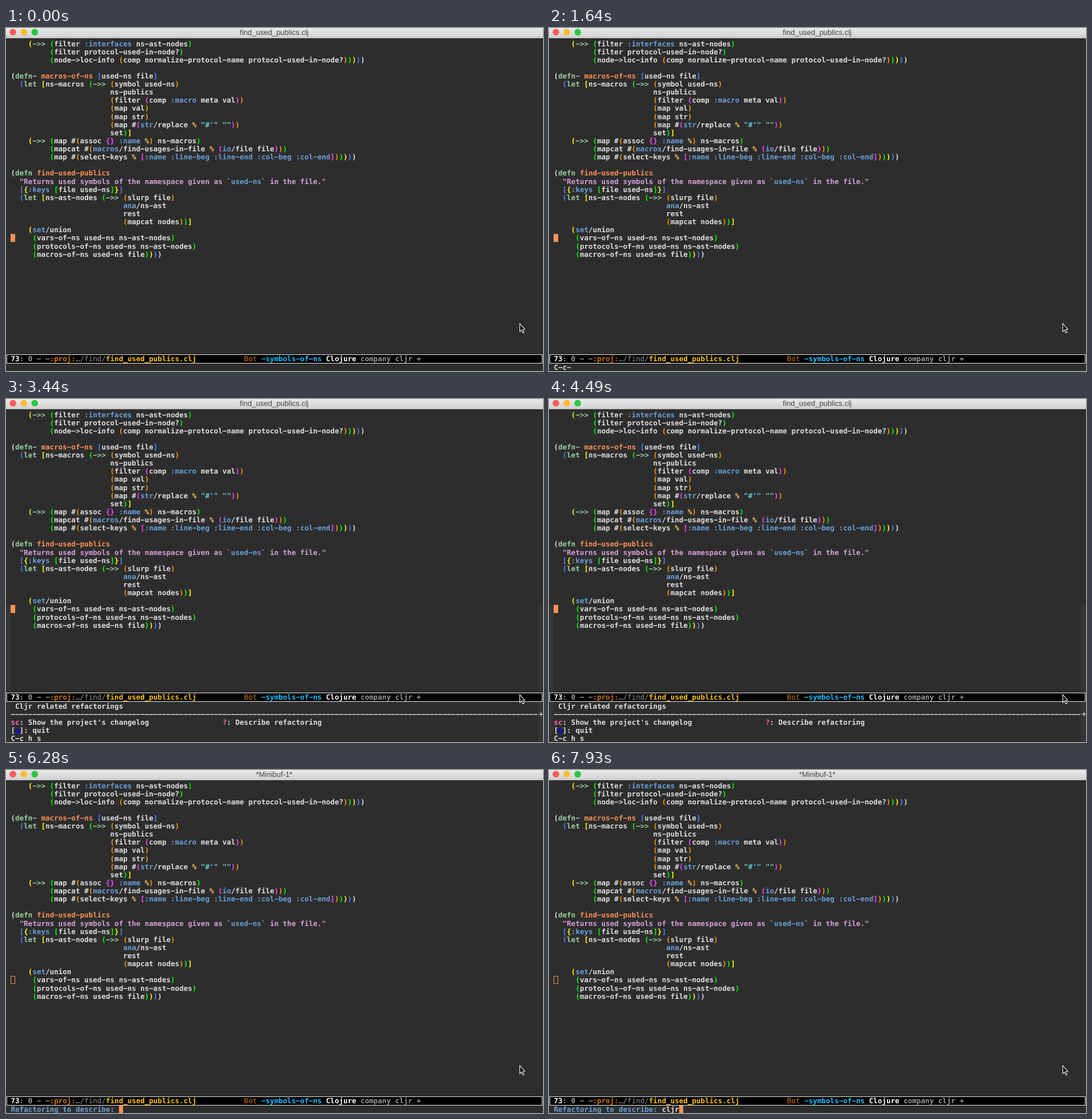
These frames come from a looping animation (936x598 px, 8000 ms). An HTML page with a canvas:

```html
<!DOCTYPE html>
<html lang="en">
<head>
<meta charset="utf-8">
<title>Editor session</title>
<style>
html, body { margin: 0; width: 100%; height: 100%; overflow: hidden; background: #2d2d2d; }
canvas { display: block; width: 936px; height: 598px; }
</style>
</head>
<body>
<canvas id="stage" width="936" height="598"></canvas>
<script>
const ctx = document.getElementById('stage').getContext('2d');
const W = 936, H = 598, LOOP = 8000;
const LEFT = 8.5, CELL = 7.525, ROW = 14.12, BASE = 31.5;
const MONO = '12.5px "DejaVu Sans Mono", monospace';

const C = {
  bg: '#2d2d2d', text: '#dedede', gray: '#999999', white: '#ffffff',
  green: '#99d0a0', orange: '#f99157', blue: '#6a9fd8', purple: '#d6a0d8',
  aqua: '#66cccc', yellow: '#ffcc66', pink: '#ff69b4'
};
const RAINBOW = ['#dedede', '#4f80ff', '#ffff00', '#00ff00', '#ff9800', '#ff40ff'];

const CODE = `    (->> (filter :interfaces ns-ast-nodes)
         (filter protocol-used-in-node?)
         (node->loc-info (comp normalize-protocol-name protocol-used-in-node?)))))

(defn- macros-of-ns [used-ns file]
  (let [ns-macros (->> (symbol used-ns)
                       ns-publics
                       (filter (comp :macro meta val))
                       (map val)
                       (map str)
                       (map #(str/replace % "#'" ""))
                       set)]
    (->> (map #(assoc {} :name %) ns-macros)
         (mapcat #(macros/find-usages-in-file % (io/file file)))
         (map #(select-keys % [:name :line-beg :line-end :col-beg :col-end])))))

(defn find-used-publics
  "Returns used symbols of the namespace given as \`used-ns\` in the file."
  [{:keys [file used-ns]}]
  (let [ns-ast-nodes (->> (slurp file)
                          ana/ns-ast
                          rest
                          (mapcat nodes))]
    (set/union
     (vars-of-ns used-ns ns-ast-nodes)
     (protocols-of-ns used-ns ns-ast-nodes)
     (macros-of-ns used-ns file))))`;

// Splits the code into coloured runs: {row, col, str, color}
function highlight(code) {
  const runs = [];
  let depth = 2, prev = '';
  code.split('\n').forEach((line, row) => {
    for (const m of line.matchAll(/"[^"]*"|[()[\]{}]|[^\s()[\]{}"]+/g)) {
      const tok = m[0];
      let col = m.index;
      const add = (str, color) => { runs.push({ row, col, str, color }); col += str.length; };
      if (/^[([{]$/.test(tok)) add(tok, RAINBOW[depth++]);
      else if (/^[)\]}]$/.test(tok)) add(tok, RAINBOW[--depth]);
      else if (tok[0] === '"') {
        if (tok.length < 5) add(tok, C.aqua);
        else tok.split('`').forEach((s, i, all) => {
          add(s, i % 2 ? C.blue : C.purple);
          if (i < all.length - 1) add('`', C.purple);
        });
      }
      else if (/^(defn-?|let|->>)$/.test(tok)) add(tok, C.green);
      else if (/^defn/.test(prev)) add(tok, C.orange);
      else if (tok[0] === ':') add(tok, C.blue);
      else if (tok === '%') add(tok, C.yellow);
      else if (tok.includes('/')) {
        const cut = tok.indexOf('/');
        add(tok.slice(0, cut), C.blue);
        add(tok.slice(cut), C.text);
      }
      else add(tok, C.text);
      prev = tok;
    }
  });
  return runs;
}
const RUNS = highlight(CODE);

const colX = col => LEFT + col * CELL;
const rowY = row => BASE + row * ROW;

// The minus glyph gives the wide hyphen of the editor font.
function put(str, col, y, color, weight = 'bold') {
  ctx.font = weight + ' ' + MONO;
  ctx.fillStyle = color;
  [...str.replace(/-/g, '\u2212')].forEach((ch, i) => {
    if (ch !== ' ') ctx.fillText(ch, colX(col + i), y);
  });
}

function rect(x, y, w, h, color) {
  ctx.fillStyle = color;
  ctx.fillRect(x, y, w, h);
}

function titleBar(title) {
  const g = ctx.createLinearGradient(0, 0, 0, 17);
  g.addColorStop(0, '#e9e9e9');
  g.addColorStop(1, '#d1d1d1');
  rect(0, 0, W, 17, g);
  rect(0, 17, W, 1, '#a8a8a8');
  ['#fc5b57', '#fdbc2f', '#28c840'].forEach((color, i) => {
    ctx.fillStyle = color;
    ctx.beginPath();
    ctx.arc(12 + 19 * i, 7.3, 5.8, 0, 7);
    ctx.fill();
  });
  ctx.font = '13px "Liberation Sans", Arial, sans-serif';
  ctx.fillStyle = '#444444';
  ctx.textAlign = 'center';
  ctx.fillText(title, 467.5, 12);
  ctx.textAlign = 'left';
}

function modeLine(top) {
  rect(1, top, 934, 16, '#000000');
  ctx.strokeStyle = '#e6e6e6';
  ctx.lineWidth = 1;
  ctx.strokeRect(1.5, top + 0.5, 933, 15);
  const y = top + 12;
  put('73', 0, y, C.white);
  put(': 0 - -', 2, y, C.gray);
  put(':proj:', 9, y, '#d2750f');
  put('…/find/', 15, y, C.gray, 'normal');
  put('find_used_publics.clj', 22, y, '#ffc414');
  put('Bot', 54, y, '#d2750f', 'normal');
  put('-symbols-of-ns', 58, y, '#1fc0ff');
  put('Clojure', 73, y, C.white);
  put('company cljr +', 81, y, C.gray);
}

function menu() {
  [[0, 8], [927, 9]].forEach(([x, w]) => {
    rect(x, 359, w, 153, '#343434');
    rect(x, 528, w, 70, '#343434');
  });
  put(' Cljr related refactorings', 0, rowY(36), C.text);
  put('-'.repeat(122), 0, rowY(37), C.text);
  put('sc', 0, rowY(38), C.pink);
  put(": Show the project's changelog", 2, rowY(38), C.text);
  put('?', 49, rowY(38), C.pink);
  put(': Describe refactoring', 50, rowY(38), C.text);
  put('[ ]: quit', 0, rowY(39), C.text);
  put('q', 1, rowY(39), '#0000ff');
  ctx.strokeStyle = C.text;
  ctx.lineWidth = 1.2;
  ctx.beginPath();
  ctx.moveTo(928, 549.5); ctx.lineTo(934.5, 549.5);
  ctx.moveTo(931.5, 546.5); ctx.lineTo(934.5, 549.5); ctx.lineTo(931.5, 552.5);
  ctx.stroke();
}

function pointer() {
  ctx.beginPath();
  [[895.5, 515.5], [895.5, 529.3], [898.6, 526.5], [900.8, 531.4],
   [903, 530.4], [900.9, 525.7], [904.3, 525.2]].forEach(p => ctx.lineTo(...p));
  ctx.closePath();
  ctx.fillStyle = '#111111';
  ctx.fill();
  ctx.strokeStyle = '#f2f2f2';
  ctx.lineWidth = 1.1;
  ctx.stroke();
}

const passed = (times, t) => times.filter(s => t >= s).length;

const BLINKS = [150, 600, 1200, 1640, 2240, 2690, 3140, 3440, 4040, 4490, 5090, 5540, 5990];
const KEYS = [7030, 7180, 7330, 7930];
const MENU = 3440, PROMPT = 6280;

function draw(t) {
  const asking = t >= PROMPT;
  const open = t >= MENU && !asking;
  ctx.textRendering = 'geometricPrecision';
  rect(0, 0, W, H, C.bg);
  titleBar(asking ? '*Minibuf-1*' : 'find_used_publics.clj');
  if (open) menu();

  RUNS.forEach(r => put(r.str, r.col, rowY(r.row), r.color));

  if (asking) {
    ctx.strokeStyle = C.orange;
    ctx.lineWidth = 1;
    ctx.strokeRect(8.5, 359.5, 7, 13);
  } else if (passed(BLINKS, t) % 2 === 0) {
    rect(8, 359, 8, 14, C.orange);
  }

  modeLine(open ? 512 : 569);

  if (asking) {
    const typed = 'cljr'.slice(0, passed(KEYS, t));
    const col = 25 + typed.length;
    const hidden = (t >= 6730 && t < 7030) || (t >= 7780 && t < 7930);
    put('Refactoring to describe:', 0, rowY(40), C.blue);
    put(typed, 25, rowY(40), C.text);
    if (!hidden) rect(Math.round(colX(col)), 585, 7, 13, C.orange);
  } else {
    const echo = open ? 'C-c h s' : ['', 'C-c-', 'C-c h-'][passed([1050, 1940], t)];
    put(echo, 0, rowY(40), C.text);
  }
  pointer();
}

const start = performance.now();
function tick() {
  draw((performance.now() - start) % LOOP);
  requestAnimationFrame(tick);
}
tick();
</script>
</body>
</html>
```
